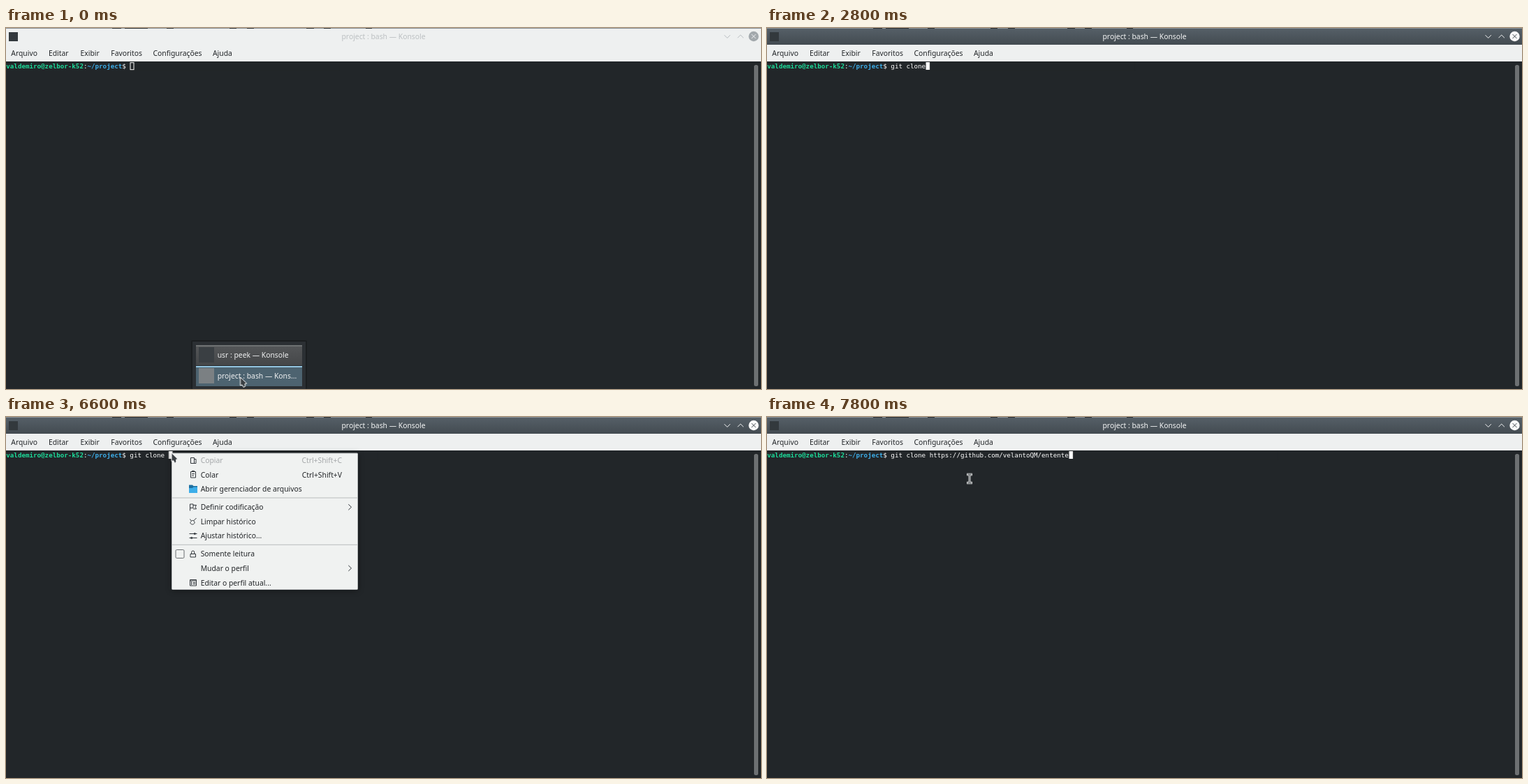
These frames come from a looping animation (1081 by 518 pixels, 8000 ms). An HTML page:

```html
<!DOCTYPE html>
<html lang="pt-BR">
<head>
<meta charset="utf-8">
<title>Terminal</title>
<style>
  html, body { margin: 0; width: 100%; height: 100%; overflow: hidden; background: #222629; }
  svg { display: block; width: 100%; height: 100%; --c: 5.54px; }
  text { font: 10.35px "Noto Sans", "Open Sans", sans-serif; fill: #232629; white-space: pre; }
  .term text { font: 9.2px "DejaVu Sans Mono", monospace; fill: #fcfcfc; }
  .b { font-weight: bold; }
  .line { fill: none; stroke: #31363b; stroke-width: 1; }
  .off text { fill: #a5a8aa; }
  .off .line { stroke: #a5a8aa; }
  .hot text { fill: #fcfcfc; }
  .hot .line { stroke: #fcfcfc; }
  .end { text-anchor: end; }
  .mid { text-anchor: middle; }

  /* every change is a hard step on a 100 ms (1.25%) grid */
  .active, .popup, .caret, .hollow, .solid, .menu, .hot, .ptr, .arrow, .beam {
    animation: 8s step-end infinite;
  }
  .active { animation-name: focus; }
  .popup { animation-name: popup; }
  .caret { animation-name: type; }
  .hollow { animation-name: hollow; }
  .solid { animation-name: solid; }
  .menu { animation-name: menu; filter: drop-shadow(0 1px 4px rgba(0, 0, 0, .4)); }
  .hot { animation-name: hot; }
  .ptr { animation-name: move; }
  .arrow { animation-name: arrow; }
  .beam { animation-name: beam; }

  @keyframes focus { 0% { opacity: 0 } 2.5% { opacity: .5 } 3.75%, 100% { opacity: 1 } }
  @keyframes popup { 0% { opacity: 1 } 2.5% { opacity: .7 } 3.75% { opacity: .3 } 5%, 100% { opacity: 0 } }
  @keyframes hollow { 0% { opacity: 1 } 2.5%, 100% { opacity: 0 } }
  @keyframes solid { 0% { opacity: 0 } 2.5%, 100% { opacity: 1 } }

  /* columns typed so far */
  @keyframes type {
    0% { transform: translateX(0) }
    20% { transform: translateX(var(--c)) }
    22.5% { transform: translateX(calc(2 * var(--c))) }
    23.75% { transform: translateX(calc(3 * var(--c))) }
    25% { transform: translateX(calc(4 * var(--c))) }
    28.75% { transform: translateX(calc(5 * var(--c))) }
    30%, 47.5% { transform: translateX(calc(6 * var(--c))) }
    31.25%, 42.5%, 51.25% { transform: translateX(calc(7 * var(--c))) }
    32.5%, 41.25%, 53.75% { transform: translateX(calc(8 * var(--c))) }
    35%, 56.25% { transform: translateX(calc(9 * var(--c))) }
    63.75% { transform: translateX(calc(10 * var(--c))) }
    91.25%, 100% { transform: translateX(calc(46 * var(--c))) }
  }

  @keyframes menu {
    0% { opacity: 0 }
    81.25% { opacity: .6 }
    82.5% { opacity: 1 }
    91.25% { opacity: .88 }
    92.5% { opacity: .65 }
    93.75% { opacity: .42 }
    95% { opacity: .22 }
    96.25% { opacity: .08 }
    97.5%, 100% { opacity: 0 }
  }
  @keyframes hot { 0% { opacity: 0 } 85%, 100% { opacity: 1 } }

  @keyframes move {
    0% { transform: translate(335.5px, 501px) }
    2.5% { transform: translate(337px, 486px) }
    3.75% { transform: translate(326px, 415px) }
    5% { transform: translate(308px, 305px) }
    6.25% { transform: translate(296px, 200px) }
    7.5% { transform: translate(291px, 140px) }
    8.75% { transform: translate(290px, 115px) }
    67.5% { transform: translate(353px, 78px) }
    68.75% { transform: translate(330px, 70px) }
    70% { transform: translate(296px, 57px) }
    71.25% { transform: translate(255px, 34px) }
    72.5% { transform: translate(222px, 25px) }
    73.75% { transform: translate(204px, 31px) }
    75% { transform: translate(213px, 56px) }
    76.25% { transform: translate(228px, 53px) }
    77.5% { transform: translate(237px, 51.5px) }
    83.75% { transform: translate(246px, 62px) }
    85% { transform: translate(264px, 75px) }
    86.25% { transform: translate(279px, 82px) }
    87.5% { transform: translate(287px, 86px) }
    88.75%, 100% { transform: translate(290px, 88.5px) }
  }
  @keyframes arrow {
    0%, 71.25%, 80% { opacity: 1 }
    5%, 75%, 91.25%, 100% { opacity: 0 }
  }
  @keyframes beam {
    0%, 20%, 71.25%, 80% { opacity: 0 }
    5%, 67.5%, 75%, 91.25%, 100% { opacity: 1 }
  }
</style>
</head>
<body>
<svg viewBox="0 0 1081 518">
  <defs>
    <linearGradient id="bar" x2="0" y2="1">
      <stop stop-color="#566068"/><stop offset="1" stop-color="#434b51"/>
    </linearGradient>
    <linearGradient id="task" x2="0" y2="1">
      <stop stop-color="#545658"/><stop offset="1" stop-color="#454749"/>
    </linearGradient>
    <path id="next" class="line" d="M-2.2-4 2-0 -2.2 4"/>
    <path id="sheet" class="line" d="M264.5 58.5h5v8h-5zM266.5 66.5h5.500v-6h-2.500"/>
    <path id="clip" class="line" d="M264.500 78.500h7v8.500h-7zM266.500 78.500v-1.200h3v1.200zM266 81.500h4M266 84h3"/>
  </defs>

  <!-- title bar, unfocused then focused -->
  <rect width="1081" height="48" fill="#eef0f0"/>
  <g>
    <rect x="4" y="6" width="13" height="13" fill="#33393d"/>
    <text class="mid" x="540.5" y="15.800" style="fill:#bcc0c2">project : bash — Konsole</text>
    <path class="line" style="stroke:#b8bdc0" d="M1028.500 10.200l4.200 4.200 4.200-4.200M1047.500 14.200l4.200-4.200 4.200 4.200"/>
    <circle cx="1070.500" cy="12" r="7.200" fill="#a2a8ac"/>
    <path class="line" style="stroke:#eff0f1" d="M1067.500 9l6 6m0-6l-6 6"/>
  </g>
  <g class="active">
    <rect width="1081" height="24" fill="url(#bar)"/>
    <rect x="4" y="6" width="13" height="13" fill="#33393d"/>
    <text class="mid" x="540.500" y="15.800" style="fill:#f4f5f5">project : bash — Konsole</text>
    <path class="line" style="stroke:#f4f5f5" d="M1028.500 10.200l4.200 4.200 4.200-4.200M1047.500 14.200l4.200-4.200 4.200 4.200"/>
    <circle cx="1070.500" cy="12" r="7.200" fill="#fcfcfc"/>
    <path class="line" style="stroke:#434b51" d="M1067.500 9l6 6m0-6l-6 6"/>
  </g>
  <path stroke="#8b9297" d="M0 .5h1081"/>
  <path stroke="#2b2f33" d="M152 .5h13m5 0h33m27 0h10m80 0h10m15 0h10m75 0h11m14 0h10m50 0h9"/>

  <g>
    <text x="7.300" y="39.600">Arquivo</text>
    <text x="61" y="39.600">Editar</text>
    <text x="106.500" y="39.600">Exibir</text>
    <text x="150.300" y="39.600">Favoritos</text>
    <text x="210.500" y="39.600">Configurações</text>
    <text x="296" y="39.600">Ajuda</text>
  </g>

  <!-- terminal -->
  <rect y="48" width="1081" height="470" fill="#222629"/>
  <rect x="1071" y="53" width="6" height="461" rx="2.500" fill="#6d7072"/>
  <g class="term">
    <text x=".3" y="57.700"><tspan class="b" fill="#1cdc9a">valdemiro@zelbor-k52</tspan>:<tspan class="b" fill="#3daee9">~/project</tspan>$ git clone https://github.com/velantoQM/entente</text>
    <g class="caret">
      <rect x="177.500" y="48.500" width="300" height="13" fill="#222629"/>
      <rect class="hollow" x="178" y="49.700" width="5" height="10" fill="none" stroke="#fcfcfc"/>
      <rect class="solid" x="177.600" y="49" width="5.500" height="11" fill="#fcfcfc"/>
    </g>
  </g>

  <!-- task list -->
  <g class="popup">
    <rect x="265" y="448" width="166" height="70" rx="2" fill="#1b1e20"/>
    <rect x="267" y="450" width="162" height="68" fill="#2b2f33"/>
    <rect x="272" y="455" width="152" height="29" fill="url(#task)"/>
    <rect x="272" y="455" width="152" height="2" fill="#6e7172"/>
    <rect x="276" y="458" width="22" height="22" fill="#3a3f43"/>
    <text x="302.700" y="472.700" style="fill:#eff0f1">usr : peek — Konsole</text>
    <rect x="272" y="485" width="152" height="29" fill="#4d6370"/>
    <rect x="272" y="485" width="152" height="2" fill="#93c5e0"/>
    <rect x="276" y="488" width="22" height="22" fill="#7b8083"/>
    <text x="302.700" y="502.700" style="fill:#eff0f1">project : bash — Kons...</text>
  </g>

  <!-- context menu -->
  <g class="menu">
    <rect x="237.500" y="52" width="266" height="195.500" rx="1" fill="#f0f2f1" stroke="#b9bcbd"/>
    <path stroke="#b9bcbd" d="M238 116h265.500M238 183.300h265.500"/>
    <g class="off">
      <use href="#sheet"/>
      <text x="278.700" y="65.800">Copiar</text>
      <text class="end" x="481" y="65.800">Ctrl+Shift+C</text>
    </g>
    <use href="#clip"/>
    <text x="278.700" y="86.500">Colar</text>
    <text class="end" x="481" y="86.500">Ctrl+Shift+V</text>
    <path fill="#1f6f9f" d="M262 97.500h5l1.500 1.500h5.500v9.500h-12z"/>
    <path fill="#3daee9" d="M262 102h5l1.500-1.500h5.500v8.500h-12z"/>
    <text x="278.700" y="107">Abrir gerenciador de arquivos</text>

    <path class="line" d="M263.500 134.500v-9.500h4.500v5.500h-4.500m4.500-4h4.500l-1.500 2.700 1.500 2.700h-4.500"/>
    <text x="278.700" y="133.200">Definir codificação</text>
    <use href="#next" x="492.500" y="129.300"/>
    <path class="line" d="M272.500 145l-4 4m-5-2.500l2 3c1-2 4-1 4.500 1.500s-3 4-5 2.500-1-3 .5-4"/>
    <text x="278.700" y="153.800">Limpar histórico</text>
    <path class="line" d="M262.500 167.500h11M262.500 173.500h11" />
    <path class="line" style="stroke-width:2.500" d="M269 167.500h2.500M264.500 173.500h2.500"/>
    <text x="278.700" y="174.400">Ajustar histórico...</text>

    <rect x="243" y="190.500" width="12" height="12" rx="1.500" fill="none" stroke="#6a6e71"/>
    <path class="line" d="M264 196.500h7.500v4.500h-7.500zM265.700 196.500v-2.500q0-2 2-2t2 2v2.500"/>
    <text x="278.700" y="200.400">Somente leitura</text>
    <text x="278.700" y="221">Mudar o perfil</text>
    <use href="#next" x="492.500" y="217"/>
    <path class="line" d="M263.500 233.500h9v8.500h-9zM263.500 235h9M265.500 236v5M267.500 237.500h4M267.500 239.500h4"/>
    <text x="278.700" y="241.600">Editar o perfil atual...</text>

    <g class="hot">
      <rect x="237.500" y="72.500" width="266" height="20.500" fill="#3daee9"/>
      <use href="#clip" style="filter:brightness(0) invert(1)"/>
      <text x="278.700" y="86.500">Colar</text>
      <text class="end" x="481" y="86.500">Ctrl+Shift+V</text>
    </g>
  </g>

  <g class="ptr">
    <path class="arrow" d="M0 0V12L2.600 11 4.600 14.600 7 13.200 6.600 9.600 9.200 9Z" fill="#3a3f43" stroke="#fcfcfc" stroke-linejoin="round"/>
    <g class="beam" fill="none">
      <path stroke="#fcfcfc" stroke-width="2.800" stroke-linecap="square" d="M-2.500-6h5M-2.500 6h5M0-6V6"/>
      <path stroke="#31363b" d="M-3-6h6M-3 6h6M0-6V6"/>
    </g>
  </g>
</svg>
</body>
</html>
```
